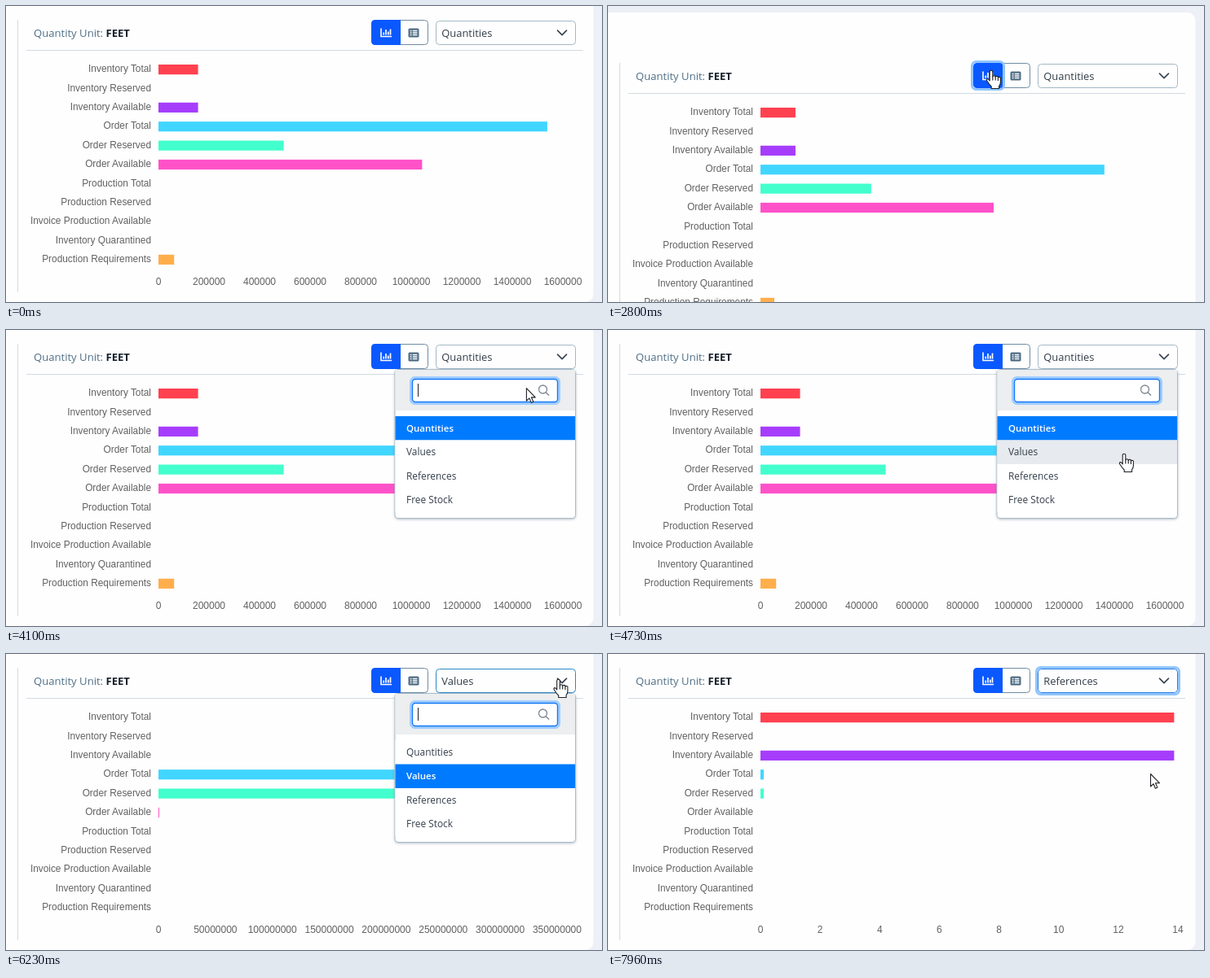
Recreate the animation shown at these times as an HTML page. Size 731 by 364 pixels, loop 8000 ms.

```html
<!DOCTYPE html>
<html lang="en">
<head>
<meta charset="utf-8">
<title>Stock quantities panel</title>
<style>
  html, body { margin: 0; width: 100%; height: 100%; overflow: hidden; background: #edf0f6; }
  svg { display: block; width: 100vw; height: 100vh; }
  text { font: 12.9px "Open Sans", "Noto Sans", sans-serif; fill: #333e4a; white-space: pre; }
  .mid { text-anchor: middle; }
  .end { text-anchor: end; }
  .unit { font-size: 13.1px; fill: #4f6f87; }
  .unit tspan { font-weight: 700; fill: #16202b; }
  #table .end { font-size: 12.75px; }
  #chart text { font: 12px "Liberation Sans", Arial, sans-serif; fill: #616161; }
  #chart .end { font-size: 11.87px; }
  #menu text { font-size: 11.9px; }
  #menu text.on { font-size: 11.5px; font-weight: 600; fill: #fff; }
  .rule { stroke: #d3dae2; }
  .cell { fill: #f6f9fa; stroke: #e0e7ec; }
  .ring { fill: none; stroke: #8fc4ff; stroke-width: 3; }
  .btn { fill: #fefefe; stroke: #6f8da3; }
  .btn-on { fill: #0a58ff; stroke: #0a58ff; }
  .cursor { fill: #fff; stroke: #1d2126; stroke-width: 1.1; stroke-linejoin: round; }
</style>
</head>
<body>
<svg viewBox="0 0 731 364" preserveAspectRatio="xMinYMin meet">
  <defs>
    <g id="icon-chart">
      <path d="M-6 -5V4.5H6.5" fill="none" stroke="currentColor" stroke-width="1.6" stroke-linecap="round"/>
      <path d="M-2.8 2.4V-.4M0 2.4V-4M2.8 2.4V-1.6M5.5 2.4V-4.4" stroke="currentColor" stroke-width="1.7"/>
    </g>
    <g id="icon-list">
      <rect x="-6.5" y="-5.5" width="13" height="11" rx="1.6" fill="currentColor"/>
      <path d="M-4.3 -2.5h1.8M-4.3 0h1.8M-4.3 2.5h1.8M-1.2 -2.5h5.6M-1.2 0h5.6M-1.2 2.5h5.6" stroke="var(--gap)" stroke-width="1.3"/>
    </g>
    <path id="left-half" d="M483.5 17.5H452.5a4 4 0 0 0-4 4V43.5a4 4 0 0 0 4 4H483.5Z"/>
    <path id="right-half" d="M483.5 17.5H513.5a4 4 0 0 1 4 4V43.5a4 4 0 0 1-4 4H483.5Z"/>
    <filter id="shadow" x="-10%" y="-10%" width="120%" height="120%">
      <feDropShadow dx="0" dy="1" stdDeviation="1.6" flood-color="#4a6075" flood-opacity=".4"/>
    </filter>
  </defs>
  <rect width="731" height="364" fill="#edf0f6"/>
  <g id="page">
    <rect id="card" x="-20" y="-45" width="740.5" height="409" rx="10" fill="#fefefe"/>
    <line id="side" class="rule" x1="14.5" x2="14.5" y1="17" y2="352"/>
    <line class="rule" x1="25" x2="708" y1="54.5" y2="54.5"/>
    <text class="unit" x="34" y="37.7">Quantity Unit: <tspan>FEET</tspan></text>

    <g id="buttons">
      <use href="#left-half" class="btn"/>
      <use href="#right-half" class="btn"/>
      <use href="#icon-chart" x="466" y="33" color="#4f6d84"/>
      <use href="#icon-list" x="500" y="33" color="#4f6d84" style="--gap:#fff"/>
      <g id="chartOn">
        <use href="#left-half" class="btn-on"/>
        <use href="#icon-chart" x="466" y="33" color="#fff"/>
      </g>
      <g id="listOn">
        <use href="#right-half" class="btn-on"/>
        <use href="#icon-list" x="500" y="33" color="#fff" style="--gap:#0a58ff"/>
      </g>
      <rect id="chartRing" class="ring" x="446.5" y="15.5" width="39" height="34" rx="5"/>
      <rect id="listRing" class="ring" x="481.5" y="15.5" width="38" height="34" rx="5"/>
    </g>

    <rect id="selectRing" class="ring" x="525.5" y="16.5" width="175" height="33" rx="5"/>
    <rect id="select" x="527.5" y="18.5" width="171" height="29" rx="4" fill="#fefefe"/>
    <text id="choice" x="534.3" y="38.2"></text>
    <path d="M676.5 30.2L682 35.7L687.5 30.2" fill="none" stroke="#3a4755" stroke-width="1.7" stroke-linecap="round" stroke-linejoin="round"/>

    <g id="chart"></g>
    <g id="table" transform="translate(0 -53)">
      <rect x="139" y="127.500" width="512.500" height="25" fill="#f5f6f7"/>
    </g>

    <g id="menu">
      <rect x="477" y="48.5" width="221.5" height="183" rx="4" fill="#fff" stroke="#a9bccb" filter="url(#shadow)"/>
      <rect x="477.5" y="49" width="220.5" height="50" fill="#eceeef"/>
      <rect x="496.5" y="58.5" width="182" height="32" rx="5" fill="none" stroke="#a0cdff" stroke-width="3"/>
      <rect x="498.5" y="60.5" width="178" height="28" rx="3.5" fill="#fff" stroke="#1579f5" stroke-width="1.4"/>
      <circle cx="658.5" cy="73" r="5" fill="none" stroke="#7d8790" stroke-width="1.3"/>
      <path d="M662.2 76.7L666 80.5" stroke="#7d8790" stroke-width="1.4"/>
      <line id="caret" x1="505.5" x2="505.5" y1="66" y2="82" stroke="#222"/>
    </g>
  </g>
  <g id="cursor">
    <path id="arrow" class="cursor" d="M.5 .5V16L4 12.7L6.4 18.2L8.9 17.1L6.5 11.7H11.4Z"/>
    <g id="hand" class="cursor">
      <path d="M-1.8 13V2A1.8 1.8 0 0 1 1.8 2V8.2A1.7 1.7 0 0 1 5.2 8.6A1.6 1.6 0 0 1 8.4 9.4A1.5 1.5 0 0 1 11.4 10.6V15Q11.4 17.5 9.6 19.5V22.5H.2V20Q-2.5 17.5-5.2 13Q-6.2 11-4.6 10.6Q-3.2 10.4-1.8 13Z"/>
      <path d="M1.8 8V12.5M5.2 8.6V12.5M8.4 9.5V13" fill="none"/>
    </g>
  </g>
</svg>
<script>
const LOOP = 8000;
const $ = id => document.getElementById(id);

function add(parent, tag, attrs, text = '') {
  const el = document.createElementNS('http://www.w3.org/2000/svg', tag);
  for (const key in attrs) el.setAttribute(key, attrs[key]);
  el.textContent = text;
  parent.appendChild(el);
  return el;
}

const show = (id, on) => { $(id).style.display = on ? '' : 'none'; };
const clamp = v => Math.max(0, Math.min(1, v));
const ramp = (t, start, span = 150) => clamp((t - start) / span);
const smooth = p => p * p * (3 - 2 * p);
const outQuart = p => 1 - (1 - p) ** 4;
const mix = (a, b, p) => a + (b - a) * p;

// Chart
const LEFT = 187;
const rows = [
  ['Inventory Total', '#ff4150'], ['Inventory Reserved'], ['Inventory Available', '#a63dfb'],
  ['Order Total', '#41d6ff'], ['Order Reserved', '#42ffcd'], ['Order Available', '#ff52c9'],
  ['Production Total'], ['Production Reserved'], ['Invoice Production Available'],
  ['Inventory Quarantined'], ['Production Requirements', '#ffae4b']
];
const bars = rows.map(([name, fill = 'none'], i) => {
  const y = 78.1 + 23.38 * i;
  add($('chart'), 'text', { class: 'end', x: 178, y: y + 3.2 }, name);
  return add($('chart'), 'rect', { x: LEFT, y: y - 6.1, height: 12.2, fill });
});

const axes = [
  { unit: 200000, gap: 62, count: 8, data: [156698.988, 0, 156698.988, 1538377.018, 495336, 1043041.018, 0, 0, 0, 0, 61917] },
  { unit: 5e7, gap: 69.85, count: 7, data: [0, 0, 0, 3.2e8, 3.2e8, 7e5] },
  { unit: 2, gap: 73.15, count: 7, data: [14, 0, 14] }
];
for (const axis of axes) {
  axis.ticks = add($('chart'), 'g', {});
  for (let i = 0; i <= axis.count; i++)
    add(axis.ticks, 'text', { class: 'mid', x: LEFT + axis.gap * i, y: 343 }, axis.unit * i);
  axis.widths = rows.map((_, i) => (axis.data[i] || 0) / axis.unit * axis.gap);
}
const empty = rows.map(() => 0);
const redraws = [
  { at: -1000, from: empty, axis: axes[0] },
  { at: 2384, from: empty, axis: axes[0] },
  { at: 5170, from: axes[0].widths, axis: axes[1] },
  { at: 7270, from: axes[1].widths, axis: axes[2] }
];

function drawChart(t) {
  const { at, from, axis } = redraws.findLast(r => t >= r.at);
  const p = outQuart(ramp(t, at, 1000));
  bars.forEach((bar, i) => bar.setAttribute('width', mix(from[i], axis.widths[i], p)));
  for (const a of axes) a.ticks.style.display = a === axis ? '' : 'none';
}

// Table
const columns = [144.5, 314.5, 485.5];
['In Inventory', 'On Order', 'In Production'].forEach((head, i) =>
  add($('table'), 'text', { class: 'mid', x: columns[i] + 80, y: 145 }, head));
[
  ['Total', '156698.988', '1538377.018', '0'],
  ['Reserved', '0', '495336', '0'],
  ['Available', '156698.988', '1043041.018', '0'],
  ['Quarantined', '0'],
  ['Unplanned', '61917']
].forEach(([name, ...cells], r) => {
  const y = 177 + 39.15 * r;
  add($('table'), 'text', { class: 'end', x: 133, y: y + 4.8 }, name);
  cells.forEach((value, c) => {
    add($('table'), 'rect', { class: 'cell', x: columns[c], y: Math.round(y) - 14.5, width: c ? 161 : 160, height: 29, rx: 4 });
    add($('table'), 'text', { x: columns[c] + 8, y: y + 4.8 }, value);
  });
});

// Menu
const OPTION_TOP = 106, OPTION_H = 29.5;
const options = ['Quantities', 'Values', 'References', 'Free Stock'].map((name, i) => {
  const y = OPTION_TOP + OPTION_H * i;
  return {
    name,
    back: add($('menu'), 'rect', { x: 477.5, y, width: 220.5, height: OPTION_H }),
    label: add($('menu'), 'text', { x: 491, y: y + 18.8 }, name)
  };
});
const opened = [[3760, 4900], [6200, 6970]];

function drawMenu(t, x, y) {
  const open = opened.find(([a, b]) => t >= a && t < b);
  const chosen = t < 4900 ? 0 : t < 6970 ? 1 : 2;
  const inX = x > 477 && x < 698;
  const hover = open && inX ? Math.floor((y - OPTION_TOP) / OPTION_H) : -1;
  const overSelect = x > 527 && x < 699 && y > 18 && y < 48 && t > 3340;
  const focused = t >= 4900 && !open;

  show('menu', open);
  show('caret', open && Math.floor((t - open[0]) / 500) % 2 === 0);
  options.forEach(({ back, label }, i) => {
    back.setAttribute('fill', i === chosen ? '#007bff' : i === hover ? '#e7eaee' : '#fff');
    label.setAttribute('class', i === chosen ? 'on' : '');
  });
  $('choice').textContent = options[chosen].name;
  show('selectRing', focused);
  $('select').setAttribute('stroke', focused ? '#2a7fe0' : overSelect ? '#2c88c6' : '#a3b8c5');
  return overSelect || (hover >= 0 && hover < options.length);
}

// Pointer: time, x, y
const path = [
  [270, 398, -26], [830, 490, 34], [1700, 490, 34], [2100, 470, 79], [2830, 470, 79],
  [3080, 508, 116], [3330, 519, 122], [3400, 624, 43], [3560, 640, 36], [3900, 640, 36],
  [4450, 633, 152], [5100, 633, 152], [5600, 692, 96], [6050, 677.5, 31], [6280, 677.5, 31],
  [6730, 648, 178], [7050, 648, 178], [7600, 665, 147], [LOOP, 665, 147]
];

function pointer(t) {
  const i = path.findIndex(p => p[0] > t);
  if (i < 1) return [398, -26];
  const [a, b] = [path[i - 1], path[i]];
  const p = smooth(ramp(t, a[0], b[0] - a[0]));
  return [mix(a[1], b[1], p), mix(a[2], b[2], p)];
}

function draw(t) {
  const tableView = t >= 1000 && t < 2384;
  const scroll = t < 1000 ? 0 : 53 * (1 - smooth(ramp(t, 2900, 200)));
  const cut = tableView ? 53 : 0;
  $('page').setAttribute('transform', `translate(0 ${scroll})`);
  $('card').setAttribute('height', 409 - cut);
  $('side').setAttribute('y2', 352 - cut);
  show('chart', !tableView);
  show('table', tableView);
  drawChart(t);

  $('chartOn').style.opacity = 1 - ramp(t, 1000) + ramp(t, 2030);
  $('listOn').style.opacity = ramp(t, 680) - ramp(t, 2384);
  $('listRing').style.opacity = ramp(t, 1000) - ramp(t, 2300);
  $('chartRing').style.opacity = ramp(t, 2300) - ramp(t, 3700);

  const [x, y] = pointer(t);
  const py = y - scroll;
  const overButtons = x > 448 && x < 518 && py > 17 && py < 48;
  const overMenu = drawMenu(t, x, py);
  // The pointer shape stays a hand for a moment after the page jumps.
  const hand = overButtons || overMenu || (t >= 1000 && t < 1500);
  show('hand', hand);
  show('arrow', !hand);
  $('cursor').setAttribute('transform', `translate(${x} ${y})`);
}

const start = performance.now();
function tick() {
  draw((performance.now() - start) % LOOP);
  requestAnimationFrame(tick);
}
tick();
</script>
</body>
</html>
```
